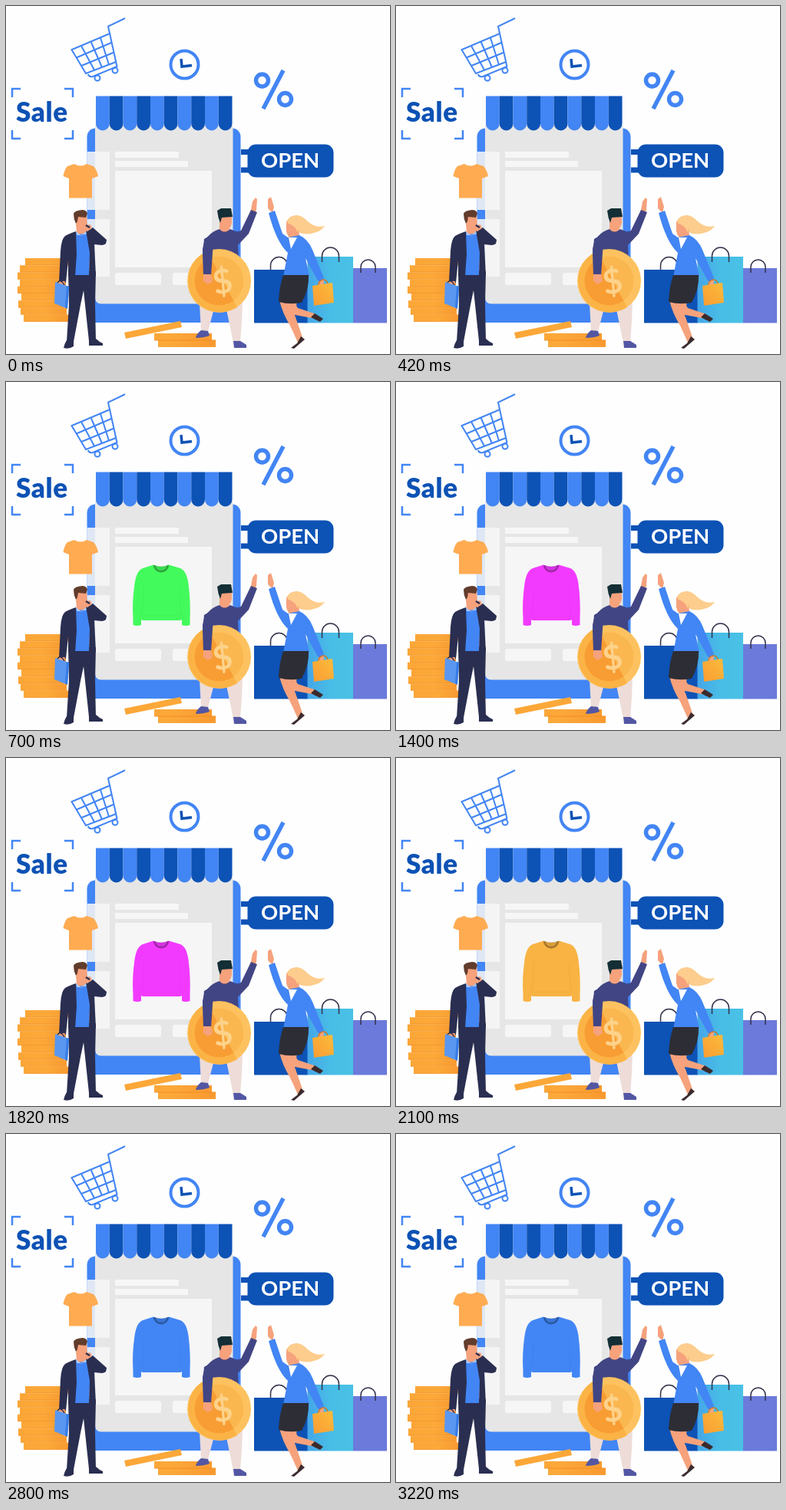
An HTML page that plays this animation: 500 by 454 pixels, repeating every 3.5 s.

```html
<!DOCTYPE html>
<html lang="en">
<head>
<meta charset="utf-8">
<title>Online store</title>
<style>
html, body { margin: 0; width: 100%; height: 100%; overflow: hidden; background: #fefefe; }
svg { display: block; width: 500px; height: 454px; }
.line { fill: none; stroke: #4285f4; stroke-width: 2; }
.handle { fill: none; stroke: #32324a; stroke-width: 1.5; }
.blue { fill: #4285f4; }
.deep { fill: #0d52b5; }
.suit { fill: #2a2e50; }
.navy { fill: #414584; }
.shoe { fill: #5356a2; }
.skin { fill: #f6a27c; }
.panel { fill: #f6f6f6; }
text { font-family: Lato, "Open Sans", sans-serif; font-weight: 700; }
</style>
</head>
<body>
<svg viewBox="0 0 500 454">
  <defs>
    <linearGradient id="gold"><stop stop-color="#fba637"/><stop offset=".5" stop-color="#fca93a"/><stop offset="1" stop-color="#f8992f"/></linearGradient>
    <linearGradient id="orange" x1="1" x2="0" y2="1"><stop stop-color="#fbbd3c"/><stop offset="1" stop-color="#f99b33"/></linearGradient>
    <linearGradient id="cyan"><stop stop-color="#45a6e8"/><stop offset=".5" stop-color="#48bde6"/><stop offset="1" stop-color="#4ac1e5"/></linearGradient>
    <clipPath id="face"><circle cx="277.500" cy="358.500" r="32"/></clipPath>
  </defs>

  <g id="cart" class="line">
    <path d="M155 16 133 26.500 144.500 79 113 92Q108 93 107 89"/>
    <path d="M135 36 85.500 57 104 88 143 73M91.500 67.500 138 47.500M98 78 140.500 60.500"/>
    <path d="M98 52 115 83.500M110.500 46.500 125 80M123 41.500 134 76.500"/>
    <circle cx="119" cy="94" r="3.500"/><circle cx="142" cy="84" r="3.500"/>
  </g>

  <g id="clock">
    <circle class="line" cx="232.500" cy="76.500" r="18" style="stroke-width:4"/>
    <path d="M228 69 229 79 242 77.500" fill="none" stroke="#0d52b5" stroke-width="3.500"/>
  </g>

  <g id="percent" class="line" style="stroke-width:5.500">
    <path d="M361 84 335 134"/>
    <circle cx="333.500" cy="97" r="8"/><circle cx="363.500" cy="121.500" r="8"/>
  </g>

  <g id="sale">
    <path class="line" d="M8 119V108H19M76 108H87V119M87 162V173H76M19 173H8V162" style="stroke-width:2.500"/>
    <text class="deep" x="13" y="151" font-size="35" letter-spacing=".6" style="font-weight:900">Sale</text>
  </g>

  <g id="store">
    <rect class="blue" x="105.500" y="159.500" width="200" height="253.500" rx="11"/>
    <path d="M116 155H295.500V380Q295.500 388.500 287 388.500H124Q116 388.500 116 380Z" fill="#e6e6e6"/>
    <g id="awning"></g>
    <g class="panel">
      <path opacity=".87" d="M105.500 190H135V266H105.500ZM105.500 278H135V353H105.500Z"/>
      <path d="M142 190H225V198H142ZM142 202H237V210H142ZM142 215H268V341H142Z"/>
      <rect x="142" y="348" width="60" height="16" rx="3"/>
      <rect x="217" y="348" width="60" height="16" rx="3"/>
    </g>
  </g>

  <g id="sweater">
    <path d="M192 238.500Q202 243 212 238.500L227 243Q235 246 237.500 263Q240.500 286 239.500 309V317Q234 319 229 317V310L227 311H178L176 310V317Q171 319 165.500 317V309Q164 287 167.500 263Q170 246 178 243Z"/>
    <path d="M176 306Q180 284 179 267M228 306Q225 284 226 267M178 305H227" fill="none" stroke="#0001" stroke-width=".7"/>
    <path d="M193 239Q195 247 202 247T211 239" fill="none" stroke="#0005" stroke-width="3"/>
    <path d="M195 239Q202 242 209 239Q207 245 202 245T195 239" fill="#0002"/>
  </g>

  <g id="sign">
    <path class="deep" d="M306 187H318V194H306ZM306 210.500H318V217.500H306Z"/>
    <rect class="deep" x="314.500" y="180.500" width="112" height="43" rx="11"/>
    <text x="332" y="211" font-size="27.500" fill="#fff">OPEN</text>
  </g>

  <path id="shirt" fill="#ffab52" d="M89 206Q97 211 105 206L114 209Q118 213 120 222L112 225V250.500H82V225L74.500 222Q76 213 80 209Z"/>

  <g id="shopping">
    <path class="handle" d="M344.500 346V338.500a11 11 0 0 1 22 0V346M411.500 334V326a11 11 0 0 1 22 0V334M462 348V340.500a9.500 9.500 0 0 1 19 0V348"/>
    <path class="deep" d="M323 344H393V413.500H323Z"/>
    <path fill="url(#cyan)" d="M392.500 327H452V413.500H392.500Z"/>
    <path fill="#6c7adb" d="M452 342H496V413.500H452Z"/>
    <path class="handle" d="M411.500 327V334M433.500 327V334M462 342V348M481 342V348"/>
  </g>

  <g id="coins" fill="url(#gold)">
    <path d="M154 426 227 411 229 419 156 434ZM193 427H268V436H193ZM198 436H273V445H198Z"/>
    <path d="M193 436H273" fill="none" stroke="#f28d25"/>
  </g>

  <g id="caller">
    <path class="suit" d="M81 346H117L116 390 117 437H108L101 371 97 390 88 438H79L82 390Z"/>
    <path class="suit" d="M79 436 88 435V444Q82 448 75 446Q76 441 79 436ZM108 434H117Q121 438 126 440V443H108Z"/>
    <path d="M91 295 105 292 110 304 108 351H89Z" class="blue"/>
    <path d="M91 292 98 300 105 292 106 297 98 299 92 299Z" fill="#a9cdfb"/>
    <path class="skin" d="M91 284 103 286 104 294Q98 301 92 295Z"/>
    <path class="suit" d="M91 294Q82 297 77 300Q72 304 71 320L69 360 78 361 81 332 81 352H90L92 324ZM104 292 112 297Q114 301 130 307Q132 311 125 312L115 311 117 352H108L109 322Z"/>
    <path class="suit" d="M106 292 113 289 131 305Q131 312 123 310L108 299Z"/>
    <path class="skin" d="M91 273 105 273 106 286Q103 292 98 290Q92 289 91 281ZM104 286 110 285 112 290 106 294Q101 293 104 286Z"/>
    <path fill="#613c2d" d="M88 271Q89 267 99 266Q105 266 106 271L104 276 94 275 93 281 91 284Q88 278 88 271Z"/>
    <path d="M104 286 109 289" stroke="#292c4e" stroke-width="2.500"/>
    <path class="skin" d="M69 359H77L75 368H70Z"/>
    <path class="handle" d="M66 363Q70 354 76 364"/>
    <path fill="#5997f0" d="M64 360 82 366 80 395 63 388Z"/>
    <path fill="#347be5" d="M79 365 82 366 80 395 77 393Z"/>
  </g>

  <g id="buyer">
    <path fill="#eddcd8" d="M252 388 308 384 307 412 305 439H296L287 396 270 398 263 425H254Z"/>
    <path class="shoe" d="M254 423 263 424 265 430Q258 433 247 433Q248 428 254 423ZM296 437H305L313 442V446H297Z"/>
    <path class="skin" d="M278 278H291V293Q284 301 278 293ZM318 271 321 255 325 250 327 252 326 266 323 274Z"/>
    <path class="navy" d="M278 291Q284 298 292 291Q301 296 306 293L319 266 327 269 316 297 302 312 304 346H262L257 350 256 317Q259 297 278 291Z"/>
    <path class="skin" d="M279 273H294V283Q292 292 287 291Q279 289 278 280Z"/>
    <path fill="#142e35" d="M275 267 280 264H293L295 275 281 276 279 283Q276 276 275 267Z"/>
    <circle cx="277.500" cy="358.500" r="41.500" fill="#fdc25f"/>
    <path d="M262 320 301 393A41.500 41.500 0 1 1 262 320Z" fill="#fbb346"/>
    <g clip-path="url(#face)">
      <path d="M245 326H310V391H245Z" fill="#fab750"/>
      <path d="M245 320H262L301 393H245Z" fill="#f89d33"/>
    </g>
    <text x="282" y="375" font-size="44" text-anchor="middle" fill="#fdd28a" transform="rotate(-10 282 360)">$</text>
    <path class="navy" d="M258 304Q266 298 270 307L267 352H257L256 324Z"/>
    <path class="skin" d="M257 350H267L269 359 263 363 257 359Z"/>
  </g>

  <g id="shopper">
    <path class="skin" d="M356 384 373 384Q373 398 377 406L386 432 380 439 370 417Q360 401 356 384ZM362 383 381 382Q376 391 380 394L404 402 403 408 371 402Q363 398 362 383Z"/>
    <path fill="#3b2a2c" d="M384 431 389 435 375 447 371 446 379 440ZM402 401 413 408 409 412Q402 409 397 406Z"/>
    <path fill="#fdcd8d" d="M365 283Q367 274 377 273Q385 272 394 282Q404 290 415 287Q410 294 401 296Q389 300 379 294Z"/>
    <path class="skin" d="M366 280 379 278 382 299Q375 308 368 301Q364 296 365 286ZM347 270 341 264V252L345 249 349 262ZM406 357 414 358 413 368 407 366Z"/>
    <path class="blue" d="M342 270 350 267 360 297 367 302 382 299Q393 304 399 318L414 355 407 360 390 329 395 353H361L367 322Q352 308 342 270Z"/>
    <path fill="#fff" d="M368 302 379 302 371 317Z"/>
    <path fill="#2d2d35" d="M361 351H394Q395 369 385 387Q369 390 355 386Q356 365 361 351Z"/>
    <path class="skin" d="M365 281 378 281V291Q377 300 372 300Q366 298 365 290Z"/>
    <path fill="#fdcd8d" d="M366 283Q367 276 374 274L382 281 380 296Q377 286 366 283Z"/>
    <path class="handle" d="M406 368Q407 357 413 357T420 366" style="stroke:#c37b2d"/>
    <path fill="url(#orange)" d="M399 365 425 361 427 387 401 391Z"/>
  </g>
</svg>
<script>
const find = id => document.getElementById(id);
const draw = (id, d, fill) => find(id).insertAdjacentHTML('beforeend', `<path d="${d}" fill="${fill}"/>`);

const stripe = 17.75;
for (let i = 0; i < 10; i++) {
  draw('awning', `M${117 + i * stripe} 117.500h${stripe}V153.500a${stripe / 2} 9 0 0 1 ${-stripe} 0Z`,
    i % 2 ? '#0d52b5' : '#4285f4');
}

[25, 18, 15, 18, 15, 20, 16, 19, 23].forEach((x, i) => {
  const y = 329 + i * 9.2;
  draw('coins', `M${x} ${y}h60v9.200h-60Z`, 'url(#gold)');
  draw('coins', `M${x} ${y + 8.4}h60v.8h-60Z`, '#f2932a');
});

const colors = [null, '#43fa5c', '#f23aff', '#f8b343', '#4286f5'];
const sweater = find('sweater');
function render(now) {
  const color = colors[Math.floor(now / 700) % colors.length];
  sweater.style.display = color ? '' : 'none';
  if (color) sweater.setAttribute('fill', color);
  requestAnimationFrame(render);
}
render(performance.now());
</script>
</body>
</html>
```
